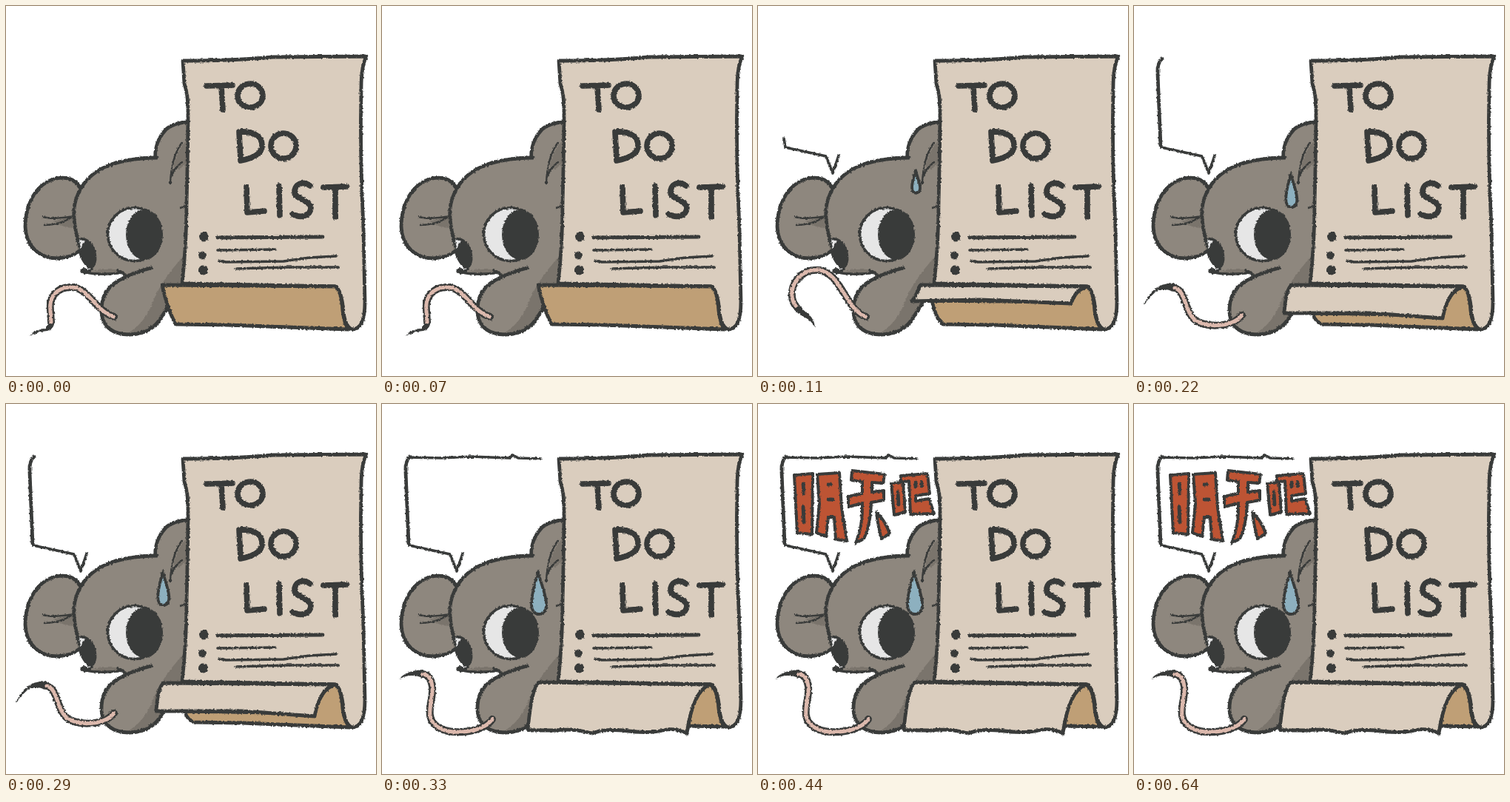
An HTML page without scripts that plays this animation: 500x500 px, repeating every 0.77 s.

```html
<!DOCTYPE html>
<html lang="en">
<head>
<meta charset="utf-8">
<title>To do list mouse</title>
<style>
  :root { --ink: #393b3a; --fur: #8e877e; --shade: #7a746c; --paper: #dacdbe; --back: #bf9f76; }
  html, body { margin: 0; width: 100%; height: 100%; overflow: hidden; background: #fff; }
  svg { display: block; width: 100%; height: 100%; }
  path, ellipse, circle { fill: none; stroke: var(--ink); stroke-width: 4.8; stroke-linecap: round; stroke-linejoin: round; }
  .thin { stroke-width: 2.4; }
  .mid { stroke-width: 3.6; }
  .bold { stroke-width: 7.6; }
  .fur { fill: var(--fur); }
  .flat { stroke: none; }
  .paper { fill: var(--paper); }
  .back { fill: var(--back); }
  .white { fill: #e6e6e6; }
  .ink { fill: var(--ink); stroke: none; }
  .shade { fill: var(--shade); stroke: none; }
  .drop { fill: #8db0bf; stroke-width: 3.8; vector-effect: non-scaling-stroke; }
  .tail { stroke: var(--line, var(--ink)); stroke-width: var(--width, 10); }
  .core { --line: #dcb9ad; --width: 5; }
  .word { fill: #bd5434; stroke-width: 4; }

  /* A pose lasts one beat of 110 ms; a "from" part stays until the loop ends. */
  .pose { animation: pose 770ms step-end calc(110ms * var(--beat) - 770ms) infinite; }
  .from1 { animation: from1 770ms step-end infinite; }
  .from2 { animation: from2 770ms step-end infinite; }
  .from3 { animation: from3 770ms step-end infinite; }
  .from4 { animation: from4 770ms step-end infinite; }
  @keyframes pose { 0% { visibility: visible } 14.2857%, 100% { visibility: hidden } }
  @keyframes from1 { 0% { visibility: hidden } 14.2857%, 100% { visibility: visible } }
  @keyframes from2 { 0% { visibility: hidden } 28.5714%, 100% { visibility: visible } }
  @keyframes from3 { 0% { visibility: hidden } 42.8571%, 100% { visibility: visible } }
  @keyframes from4 { 0% { visibility: hidden } 57.1428%, 100% { visibility: visible } }
</style>
</head>
<body>
<svg viewBox="0 0 500 500">
  <defs>
    <filter id="crayon" filterUnits="userSpaceOnUse" x="0" y="0" width="500" height="500" color-interpolation-filters="sRGB">
      <feTurbulence type="fractalNoise" baseFrequency=".4" seed="4"/>
      <feDisplacementMap in="SourceGraphic" scale="3.5" xChannelSelector="R" yChannelSelector="G"/>
    </filter>
    <path id="drop" class="drop" d="M0 0C-4 17-9 29-9 44C-9 54-4 58 1 58C8 58 12 52 11 42C9 26 4 19 0 0Z"/>
  </defs>

  <g filter="url(#crayon)">
    <!-- mouse -->
    <path class="fur" d="M102 252C98 235 84 230 68 233C42 239 26 266 26 298C27 326 46 341 70 341C84 340 92 337 99 331"/>
    <path class="shade" d="M64 291Q80 286 93 285V300Q78 300 64 291Z"/>
    <path class="thin" d="M50 285Q63 289 92 284M52 296Q72 296 88 286"/>
    <path class="fur" d="M204 219C198 198 204 180 216 167Q227 157 248 157V250H210"/>
    <path class="shade" d="M222 242Q226 200 243 183V213Q230 222 222 242Z"/>
    <path class="fur flat" d="M97 315C91 290 89 272 97 255C111 221 145 206 204 205L250 230V380H238L222 402Q213 425 195 437C175 447 152 445 142 439C126 431 124 404 136 388Q143 376 160 367L158 361Q130 364 104 360Q113 359 116 355Q102 345 97 315Z"/>
    <path class="shade" d="M240 338V383L222 402Q212 425 195 437Q183 443 163 443Q186 430 196 406Q208 372 240 338Z"/>
    <path class="shade" d="M116 358Q138 354 156 357L166 365L158 361Q135 365 116 358Z"/>
    <path d="M97 317C91 290 89 272 97 255C111 221 145 206 204 205"/>
    <path class="thin" d="M238 184Q223 205 222 240M238 211Q226 220 223 231M236 273L242 270"/>
    <path class="white mid" d="M97 315Q110 312 118 327L104 340Q99 330 97 315Z"/>
    <ellipse class="ink" cx="112" cy="336" rx="10" ry="19" transform="rotate(-10 112 336)"/>
    <path class="mid" d="M99 330Q104 349 116 355Q111 361 104 359Q128 365 158 360M151 357L161 363"/>
    <path class="ink" d="M100 359Q103 352 109 355L116 358Q108 366 100 359Z"/>
    <ellipse class="white mid" cx="173.5" cy="308.5" rx="36" ry="36"/>
    <ellipse class="ink" cx="187" cy="309" rx="25" ry="34"/>
    <path d="M196 354Q174 360 160 367C137 377 128 394 129 414C130 434 145 444 167 444Q194 443 207 425L222 402"/>

    <!-- sweat -->
    <g class="pose" style="--beat:1"><use href="#drop" transform="translate(213 222) scale(.55 .53)"/></g>
    <g class="pose" style="--beat:2"><use href="#drop" transform="translate(212 226) scale(.75 .79)"/></g>
    <g class="from3"><use href="#drop" transform="translate(211 226)"/></g>

    <!-- tail -->
    <g class="pose" style="--beat:0">
      <path class="ink" d="M56 424L65 426Q66 436 56 439Q43 440 32 446Q38 438 51 436Q58 434 56 424Z"/>
      <path id="tail-arch" class="tail" d="M146 420C120 412 112 380 88 380C66 380 58 396 60 412L61 427"/>
      <use href="#tail-arch" class="core"/>
    </g>
    <g class="pose" style="--beat:1">
      <path class="ink" d="M48 409L55 402Q61 412 69 417Q76 424 77 434Q71 424 62 420Q53 416 48 409Z"/>
      <path id="tail-hook" class="tail" d="M146 420C120 412 112 362 84 357C58 354 44 376 46 393Q47 401 51 405"/>
      <use href="#tail-hook" class="core"/>
    </g>
    <g class="pose" style="--beat:2">
      <path class="ink" d="M56 375L53 386Q43 381 33 384Q23 390 13 405Q19 389 30 381Q43 373 56 375Z"/>
      <path id="tail-wave" class="tail" d="M146 418C130 436 92 435 80 422C68 410 70 385 55 381"/>
      <use href="#tail-wave" class="core"/>
    </g>
    <g class="from3">
      <path class="ink" d="M56 359L55 370Q38 363 23 372Q32 360 56 359Z"/>
      <path id="tail-low" class="tail" d="M149 426C135 445 95 447 78 438C54 425 70 402 68 382Q66 366 55 365"/>
      <use href="#tail-low" class="core"/>
    </g>

    <!-- sheet -->
    <path class="paper" d="M239 74Q310 74 360 69L487 68Q480 82 480 110Q478 200 483 300L485 400Q485 437 468 437Q459 434 456 414Q454 384 445 379L238 375Q244 320 244 270Q246 180 246 140Q246 120 241 105Z"/>
    <g role="img" aria-label="TO DO LIST">
      <path class="bold" d="M271 108L306 107M291 109L293 140M315 170L317 209C334 206 347 199 346 187C345 175 333 169 315 170"/>
      <ellipse class="bold" cx="330" cy="121" rx="17" ry="16"/>
      <ellipse class="bold" cx="375" cy="189" rx="17" ry="17"/>
      <path class="bold" d="M325 244L326 279L349 277M369 243L370 283M411 243C400 235 389 242 390 252C391 262 412 262 412 273C411 285 397 287 387 281M429 245L460 244M445 246V285"/>
    </g>
    <circle class="ink" cx="267.5" cy="312" r="6.5"/>
    <circle class="ink" cx="265.5" cy="337" r="5.5"/>
    <circle class="ink" cx="266.5" cy="357" r="6.5"/>
    <path d="M286 313L428 312"/>
    <path class="mid" d="M286 330L364 329M311 355L380 353L449 353M288 344L297 346L375 345L410 340L446 338"/>

    <!-- curling flap -->
    <g class="pose" style="--beat:0">
      <path class="back" d="M211 377L445 379Q453 384 455 412Q457 430 463 437L300 431L229 430Q217 406 211 377Z"/>
    </g>
    <g class="pose" style="--beat:1">
      <path class="back" d="M235 398Q241 424 250 430L320 431L465 437Q457 430 455 412Q453 384 445 379Q428 385 423 400Z"/>
      <path class="paper" d="M219 377L443 379Q428 385 423 402L300 397L208 399Q216 388 219 377Z"/>
    </g>
    <g class="pose" style="--beat:2">
      <path class="back" d="M241 415Q246 428 254 430L320 431L465 437Q457 430 455 412Q453 384 445 379Q424 386 417 418Z"/>
      <path class="paper" d="M213 377L443 379Q424 386 417 422L320 415L203 415Q205 383 213 377Z"/>
    </g>
    <g class="from3">
      <path class="back" d="M414 435L463 436Q457 430 455 412Q453 384 443 379Q420 388 414 435Z"/>
      <path class="paper" d="M212 376L443 379Q420 388 412 445Q396 437 380 441Q360 446 325 441Q300 439 284 445Q258 438 235 441L197 441Q202 384 212 376Z"/>
    </g>

    <!-- speech bubble -->
    <path class="from1 mid" d="M35 179L37 191L92 203L101 226L109 202"/>
    <path class="from2" d="M38 71Q31 77 32 92L36 189"/>
    <path class="from3 mid" d="M35 72L80 73L120 71L172 73L177 69L184 73L215 74"/>
    <g class="from4" role="img" aria-label="明天吧">
      <path class="word" d="M49 96L74 94L73 176L53 174Z"/>
      <path class="word" d="M80 95L110 93L113 140L120 185L105 183L103 153H95L92 179L79 174L83 135Z"/>
      <path class="word" d="M127 90L171 95L169 107L154 106V119L170 117V130L153 133Q152 164 143 182L132 188Q142 165 141 134L122 139V125L141 121V105L126 103Z"/>
      <path class="word" d="M160 146Q172 158 178 175L167 182Q162 165 160 146Z"/>
      <path class="word" d="M180 107L196 106L199 146L184 150Z"/>
      <path class="word" d="M193 97L229 94L232 121L213 124V131L231 128L238 148L206 149L204 104L193 106Z"/>
      <path d="M61 108L62 121M61 139L62 160M95 109H99M95 129H101M189 119L190 136M213 106V112M221 106V111"/>
    </g>
  </g>
</svg>
</body>
</html>
```
